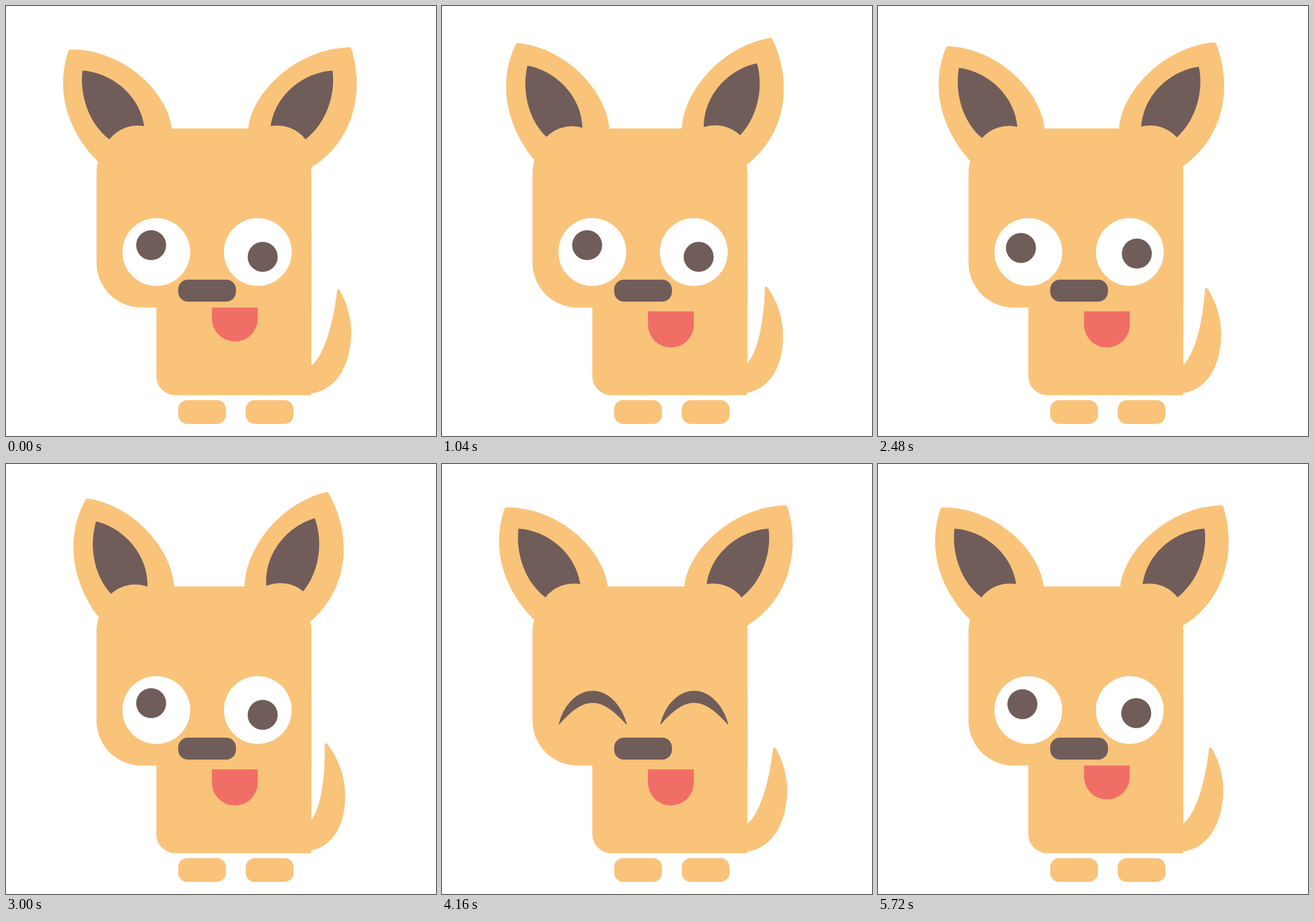
These frames come from a looping animation (748x748 px, 5760 ms). An HTML page with a canvas:

```html
<!DOCTYPE html>
<html>
<head>
<meta charset="utf-8">
<style>
html, body { margin: 0; width: 100%; height: 100%; overflow: hidden; background: #fff; }
canvas { display: block; width: 748px; height: 748px; }
</style>
</head>
<body>
<canvas id="stage" width="748" height="748"></canvas>
<script>
const ctx = document.getElementById('stage').getContext('2d');
const TAN = '#f9c37a', DARK = '#705d5a', RED = '#f16e66', WHITE = '#fff';
const STEP = 40, STEPS = 144;

// Outlines in the resting pose
const leftEar = new Path2D('M115 75.5C200 76 280 145 288.5 213L290 260L200 300L160 271' +
  'C105 215 86 145 108.5 78.5Q109.8 75.2 115 75.5Z');
const leftInner = new Path2D('M133 112.5C180 115 232 152 240.5 209' +
  'A62.8 62.8 0 0 0 180 232C144 205 128 155 133 112.5Z');
const rightEar = new Path2D('M596 72C505 75 428 150 421.5 213L419 260L490 304L531 281' +
  'C601 238 625 155 601 75Q600 71.6 596 72Z');
const rightInner = new Path2D('M568 112.5C520 115 469 152 460.5 209' +
  'A62.8 62.8 0 0 1 521 232C556 205 574 155 568 112.5Z');
const tail = new Path2D('M576 495Q577.5 491.5 580 494C594 517 601 545 600.5 570' +
  'C599 625 575 668 531 674L505 670L505 640L531 626C553 608 569 555 576 495Z');
const lid = new Path2D('M203.5 453C212 418 236 395 262 395C288 395 312 418 321 453' +
  'C300 430 282 415 262 415C242 415 224 430 203.5 453Z');

// Pupil places for the three wobble positions
const pupils = [
  [252.5, 416, 446.5, 436.4],
  [251.2, 417.8, 449.2, 433.4],
  [248.7, 420.8, 450.3, 430.7]
];
const wobble = [0, 1, 2, 1, 0, 1, 0, 1, 0, 0];

// Climbs one unit per step, rests one step at either end, and returns
function swing(n, length) {
  const i = n % length;
  return Math.min(i, length - 1 - i);
}

function turned(x, y, degrees, draw) {
  ctx.save();
  ctx.translate(x, y);
  ctx.rotate(degrees * Math.PI / 180);
  ctx.translate(-x, -y);
  draw();
  ctx.restore();
}

function fill(color, path) {
  ctx.fillStyle = color;
  ctx.fill(path);
}

function box(color, x, y, w, h, r) {
  ctx.fillStyle = color;
  ctx.beginPath();
  ctx.roundRect(x, y, w, h, r);
  ctx.fill();
}

function disc(color, x, y, r) {
  ctx.fillStyle = color;
  ctx.beginPath();
  ctx.arc(x, y, r, 0, Math.PI * 2);
  ctx.fill();
}

function drawLid(dx) {
  ctx.save();
  ctx.translate(dx, 0);
  fill(DARK, lid);
  ctx.strokeStyle = DARK;
  ctx.lineWidth = 1;
  ctx.lineJoin = 'round';
  ctx.stroke(lid);
  ctx.restore();
}

function pupilPose(n) {
  if (n < 62 || n >= 120) return wobble[n % 10];
  return Math.max(0, Math.min(2, 75 - n));
}

function drawEyes(n) {
  if (n >= 100 && n < 120) {
    drawLid(0);
    drawLid(176.5);
    return;
  }
  const [lx, ly, rx, ry] = pupils[pupilPose(n)];
  disc(WHITE, 261.5, 428, 59);
  disc(WHITE, 438, 428, 59);
  disc(DARK, lx, ly, 26.1);
  disc(DARK, rx, ry, 26.1);
}

function drawTongue(n) {
  const k = swing(n, 6);
  const top = 524.5 + 3.35 * k;
  const bottom = [583.5, 590, 594][k];
  box(RED, 358.3, top, 79.7, bottom - top, [0, 0, 39.5, 39.5]);
}

function draw(n) {
  ctx.fillStyle = WHITE;
  ctx.fillRect(0, 0, 748, 748);

  const k = swing(n, 8);
  turned(515, 650, -2.6 * k, () => fill(TAN, tail));
  box(TAN, 157.5, 213, 373.7, 311.5, [78, 78, 0, 78]);
  box(TAN, 261.5, 400, 269.7, 277, [0, 0, 3, 33]);
  turned(218.5, 245, 3.25 * k, () => {
    fill(TAN, leftEar);
    fill(DARK, leftInner);
  });
  turned(470.5, 245, -4.15 * k, () => {
    fill(TAN, rightEar);
    fill(DARK, rightInner);
  });

  drawEyes(n);
  box(DARK, 299.5, 476, 100.5, 38.3, 17);
  drawTongue(n);
  box(TAN, 299.5, 685.5, 83.2, 41.5, 16);
  box(TAN, 417, 685.5, 83.2, 41.5, 16);
}

function tick() {
  draw(Math.floor(performance.now() / STEP) % STEPS);
  requestAnimationFrame(tick);
}
tick();
</script>
</body>
</html>
```
